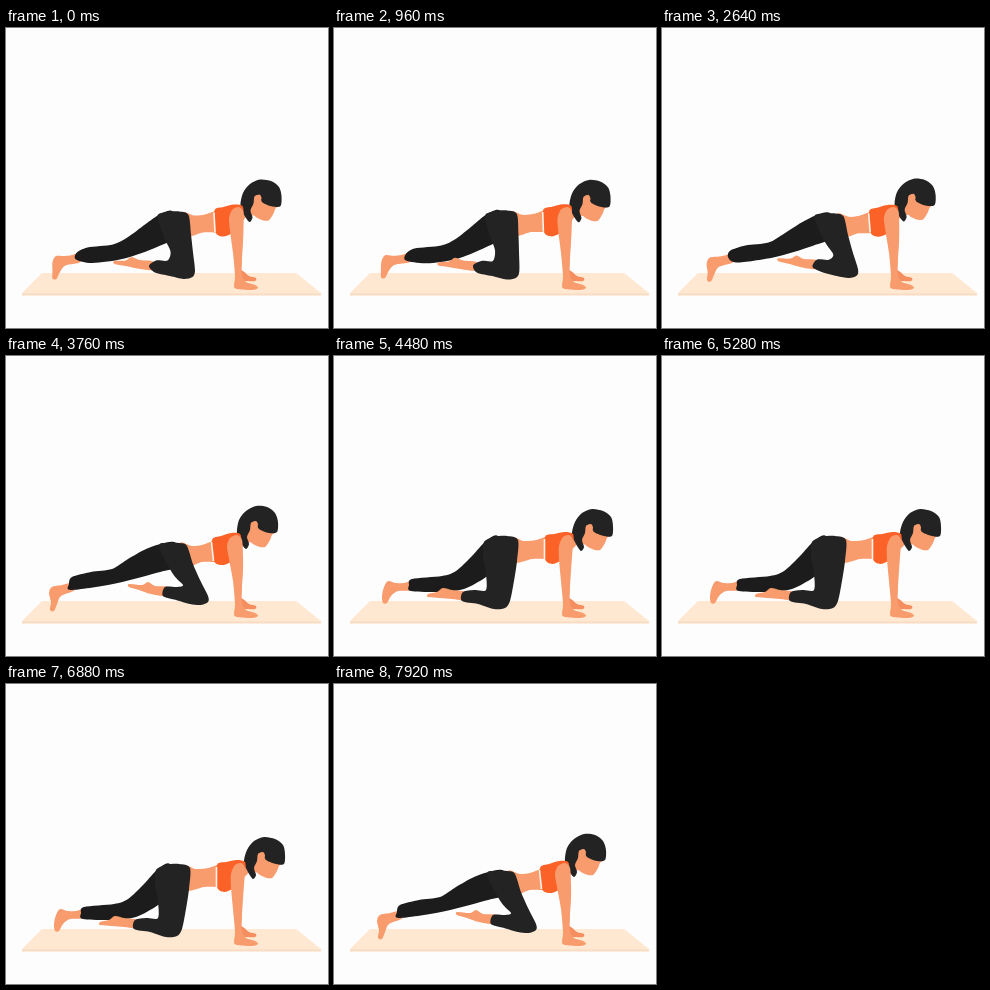
Recreate the animation shown at these times as an HTML page with a canvas. Size 322 by 300 pixels, loop 8 s.

```html
<!DOCTYPE html>
<html lang="en">
<head>
<meta charset="utf-8">
<title>Knee slide</title>
<style>
html, body { margin: 0; width: 100%; height: 100%; overflow: hidden; background: #fdfdfd; }
canvas { display: block; }
</style>
</head>
<body>
<canvas id="stage"></canvas>
<script>
const W = 322, H = 300, STEP = 80, LOOP = 8000;
const canvas = document.getElementById('stage');
const ctx = canvas.getContext('2d');
const ratio = window.devicePixelRatio || 1;
canvas.width = W * ratio;
canvas.height = H * ratio;
canvas.style.width = W + 'px';
canvas.style.height = H + 'px';
ctx.scale(ratio, ratio);

const SKIN = '#f89b6d', SHADE = '#f58d5e', DARK = '#232323', BLACK = '#1c1c1c', TOP = '#fb6228';

// Each part: colour, outline when kneeling back, outline when pushed forward.
const parts = [
  // far hand
  [SHADE, [231,242, 237,243, 243,248, 250,250, 249,253, 241,253, 233,252],
          [231,242, 237,243, 243,248, 250,250, 249,253, 241,253, 233,252]],
  // stretched foot and leg
  [SKIN, [80,225, 70,227, 62,227, 54,225, 50,231, 48,240, 49,247, 53,247, 57,240, 64,235, 80,234],
         [69,224, 63,227, 56,229, 46,231, 43,237, 45,246, 44,254, 48,255, 51,248, 55,240, 69,234]],
  [BLACK, [164,180, 152,185, 138,200, 122,215, 108,220, 78,223, 75,229, 77,235, 108,236, 130,233, 152,221, 172,203],
          [170,187, 155,188, 140,193, 122,203, 106,213, 85,216, 66,221, 63,228, 65,234, 107,228, 150,217, 182,207]],
  // bent foot
  [SKIN, [132,236, 118,234, 109,232, 103,236, 94,238, 94,241, 106,242, 118,243, 132,244],
         [162,231, 149,230, 142,226, 136,229, 123,228, 123,231, 133,234, 145,238, 162,240]],
  // belly
  [SKIN, [178,182, 190,185, 202,184, 216,180, 228,183, 224,204, 212,203, 198,203, 180,206],
         [174,187, 186,190, 196,189, 210,184, 224,183, 222,205, 208,206, 196,206, 182,209]],
  // bent leg and hips
  [DARK, [150,186, 160,181, 173,180, 184,184, 183,205, 180,225, 176,245, 171,252, 160,253, 144,248, 128,245, 129,236, 141,234, 152,234, 152,218, 149,200],
         [153,190, 163,187, 174,187, 181,190, 187,208, 194,224, 202,240, 202,246, 195,249, 184,248, 170,244, 157,240, 159,231, 171,231, 177,229, 167,218, 155,203]],
  // neck and face
  [SKIN, [230,181, 239,177, 246,171, 256,178, 253,188, 244,188, 238,193, 230,194],
         [225,182, 233,177, 240,169, 249,175, 246,185, 238,188, 234,194, 226,194]],
  [SKIN, [248,174, 256,166, 270,170, 277,178, 273,182, 271,187, 266,194, 258,193, 250,187],
         [241,171, 249,163, 263,167, 270,175, 266,179, 264,184, 259,191, 251,190, 243,184]],
  // hair
  [DARK, [238,178, 241,166, 248,157, 258,153, 269,155, 277,161, 279,170, 278,180, 270,180, 260,176, 257,169, 252,170, 251,177, 248,184, 250,191, 247,195, 242,188],
         [231,177, 233,164, 240,155, 250,150, 261,151, 269,157, 272,166, 271,176, 263,177, 253,173, 250,166, 245,167, 244,174, 241,181, 243,188, 240,193, 235,187]],
  // ear
  [SKIN, [253,170, 257,168, 259,172, 256,177, 252,177],
         [246,167, 250,165, 252,169, 249,174, 245,174]],
  // crop top
  [TOP, [211,181, 220,178, 231,176, 239,178, 239,187, 234,199, 226,205, 218,208, 211,203],
        [206,184, 215,180, 225,177, 234,178, 235,187, 230,200, 223,207, 215,209, 208,205]],
  // near arm
  [SKIN, [229,181, 235,179, 239,184, 238,201, 237,215, 236,232, 236,247, 240,254, 249,257, 252,260, 246,262, 231,261, 228,258, 229,248, 227,225, 225,203, 225,190],
         [224,182, 231,179, 236,184, 237,201, 237,215, 236,232, 236,247, 240,254, 249,257, 252,260, 246,262, 231,261, 228,258, 229,248, 227,225, 223,203, 221,190]]
];

const mix = (a, b, p) => a.map((v, i) => v + (b[i] - v) * p);

function blob(color, pts) {
  const n = pts.length / 2;
  const at = i => [pts[(i + n) % n * 2], pts[(i + n) % n * 2 + 1]];
  ctx.beginPath();
  ctx.moveTo(pts[0], pts[1]);
  for (let i = 0; i < n; i++) {
    const [a, b, c, d] = [at(i - 1), at(i), at(i + 1), at(i + 2)];
    ctx.bezierCurveTo(b[0] + (c[0] - a[0]) / 7, b[1] + (c[1] - a[1]) / 7,
                      c[0] - (d[0] - b[0]) / 7, c[1] - (d[1] - b[1]) / 7, c[0], c[1]);
  }
  ctx.fillStyle = color;
  ctx.fill();
}

function poly(color, ...pts) {
  ctx.beginPath();
  for (let i = 0; i < pts.length; i += 2) ctx.lineTo(pts[i], pts[i + 1]);
  ctx.fillStyle = color;
  ctx.fill();
}

// Size of the swing grows over the loop: [step, amount].
const swing = [[0, 0], [23, .54], [33, .54], [46, 1], [100, 1]];

function amount(k) {
  const i = swing.findIndex(s => s[0] > k);
  const [k0, a] = swing[i - 1], [k1, b] = swing[i];
  return a + (b - a) * (k - k0) / (k1 - k0);
}

function draw(ms) {
  const k = Math.floor(ms % LOOP / STEP);
  const p = .5 + (k % 2 ? .5 : -.5) * amount(k);
  ctx.fillStyle = '#fdfdfd';
  ctx.fillRect(0, 0, W, H);
  poly('#f8dcc1', 16, 265, 315, 265, 315, 267.5, 16, 267.5);
  poly('#fee8d2', 36, 245, 290, 245, 315.5, 265.5, 15.5, 265.5);
  for (const [color, back, front] of parts) blob(color, mix(back, front, p));

  const [x, y, x2, y2] = mix([210.5, 183, 210.5, 203], [205.5, 186, 207.5, 205], p);
  ctx.strokeStyle = '#fff4ec';
  ctx.lineWidth = 1.6;
  ctx.beginPath();
  ctx.moveTo(x, y);
  ctx.lineTo(x2, y2);
  ctx.stroke();
}

const start = performance.now();
function tick() {
  draw(performance.now() - start);
  requestAnimationFrame(tick);
}
tick();
</script>
</body>
</html>
```
